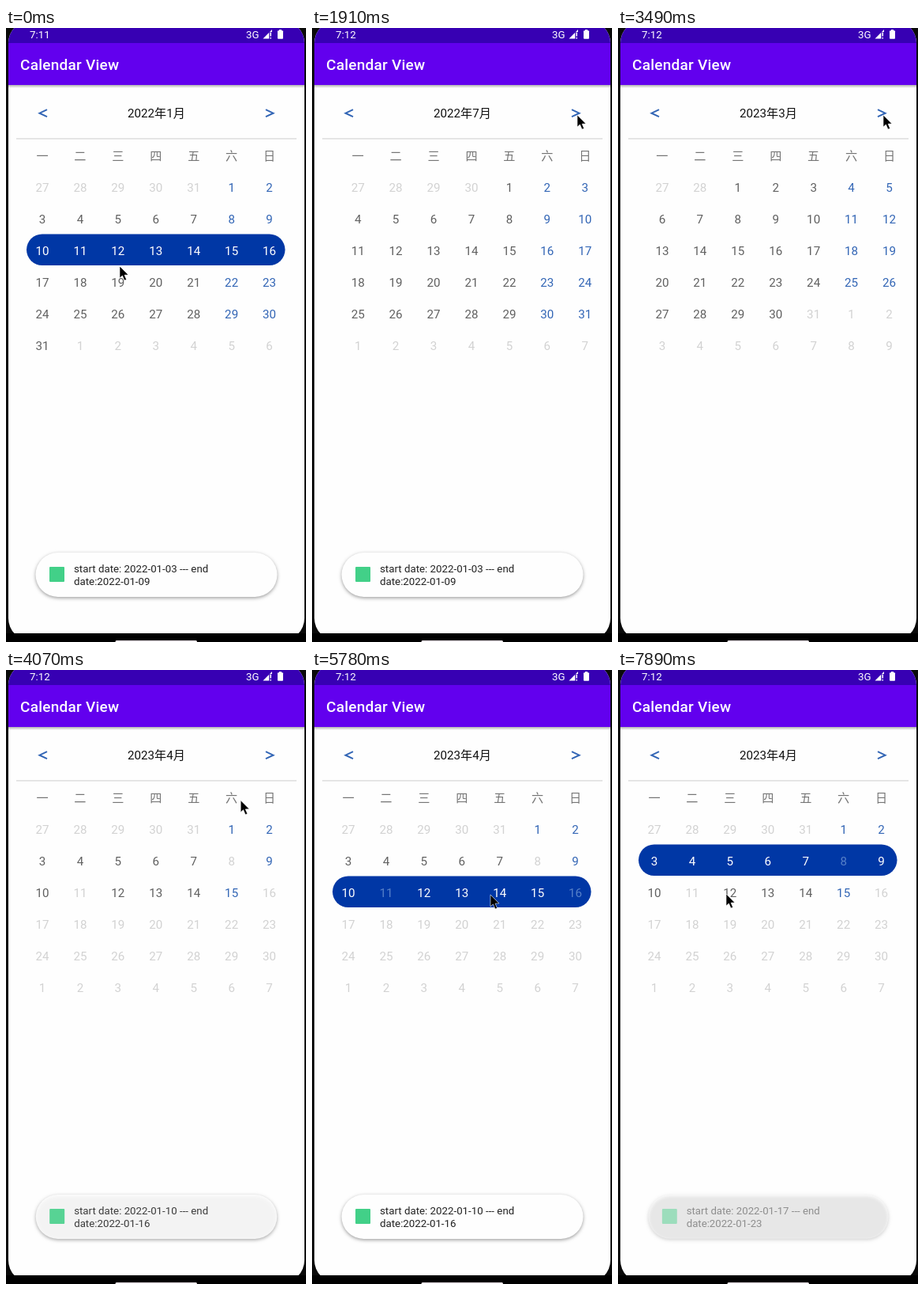
These frames come from a looping animation (380 by 776 pixels, 8 s). An HTML page with a canvas:

```html
<!DOCTYPE html>
<html lang="zh-CN">
<head>
<meta charset="utf-8">
<title>Calendar View</title>
<style>
html, body { margin: 0; width: 100%; height: 100%; overflow: hidden; background: #0a0a0a; }
canvas { display: block; width: 380px; height: 776px; }
</style>
</head>
<body>
<canvas id="stage"></canvas>
<script>
const LOOP = 8000, W = 380, H = 776;
const PAGE = 355, SLIDE = 210;
const FONT = 'Roboto, "Noto Sans CJK SC", "Noto Sans CJK", sans-serif';
const BLUE = '#3265b5', PILL = '#0037a5', TEXT = '#606060', FAINT = '#d2d2d2';

const canvas = document.getElementById('stage');
const ctx = canvas.getContext('2d');
const dpr = window.devicePixelRatio || 1;
canvas.width = W * dpr;
canvas.height = H * dpr;

// Screen updates come in bursts: [first, last, count]
const bursts = [
  [0, 0, 1], [130, 640, 5], [940, 1910, 8], [2060, 3040, 8], [3190, 4220, 8],
  [4340, 5360, 8], [5510, 6460, 8], [6610, 7010, 4], [7320, 7890, 5]
];

// Pointer path: [time, x, y]
const pointerPath = [
  [0, 144, 301], [257, 146, 306], [512, 318, 128], [640, 336, 110],
  [3780, 336, 110], [4073, 258, 220], [4220, 232, 236], [4500, 229, 240],
  [4920, 225, 277], [5360, 225, 280], [5650, 226, 284], [6050, 262, 250],
  [6460, 280, 246], [6610, 85, 301], [7010, 110, 296], [7320, 116, 293], [7890, 137, 283]
];

// Toasts: [fade-in start, fade-out start, first day, last day]
const toasts = [
  [-1000, 3200, '2022-01-03', '2022-01-09'],
  [3750, 7250, '2022-01-10', '2022-01-16'],
  [7800, 12000, '2022-01-17', '2022-01-23']
];

const clamp = v => Math.max(0, Math.min(1, v));

function sampleTime(t) {
  const [first, last, count] = bursts.filter(b => b[0] <= t).pop();
  if (count === 1) return first;
  const step = (last - first) / (count - 1);
  return first + step * Math.min(count - 1, Math.floor((t - first) / step + 1e-6));
}

function pointerAt(t) {
  const i = pointerPath.findIndex(p => p[0] > t);
  if (i < 0) return pointerPath[pointerPath.length - 1].slice(1);
  const [t0, x0, y0] = pointerPath[i - 1], [t1, x1, y1] = pointerPath[i];
  const k = (t - t0) / (t1 - t0);
  return [x0 + (x1 - x0) * k, y0 + (y1 - y0) * k];
}

// Months are counted from January 2022
const slideStart = m => m <= 6 ? 805 + 200.4 * (m - 1) : 1807 + 196.25 * (m - 6);

function monthAt(t) {
  let m = 0;
  while (m < 15 && slideStart(m + 1) <= t) m++;
  return m;
}

function selectedRow(m, t) {
  if (m === 0) return t < 250 ? 2 : 3;
  if (m === 15 && t >= 4480) return t >= 5060 && t < 6050 ? 2 : 1;
  return -1;
}

function isDisabled(date) {
  const m = (date.getFullYear() - 2022) * 12 + date.getMonth(), d = date.getDate();
  return m > 15 || (m === 14 && d === 31) || (m === 15 && (d === 8 || d === 11 || d > 15));
}

function text(str, x, y, size, color, align = 'left', weight = 400) {
  ctx.font = `${weight} ${size}px ${FONT}`;
  ctx.fillStyle = color;
  ctx.textAlign = align;
  ctx.fillText(str, x, y);
}

function rect(x, y, w, h, color, radius = 0) {
  ctx.fillStyle = color;
  ctx.beginPath();
  ctx.roundRect(x, y, w, h, radius);
  ctx.fill();
}

function poly(points, color) {
  ctx.beginPath();
  points.forEach(([x, y]) => ctx.lineTo(x, y));
  ctx.closePath();
  ctx.fillStyle = color;
  ctx.fill();
}

function chevron(x, dir) {
  ctx.beginPath();
  ctx.moveTo(x - 5 * dir, 103.2);
  ctx.lineTo(x + 4.5 * dir, 107.7);
  ctx.lineTo(x - 5 * dir, 112.2);
  ctx.strokeStyle = BLUE;
  ctx.lineWidth = 2;
  ctx.stroke();
}

function drawMonth(m, left, t) {
  const colX = c => left + 46 + 47.93 * c;
  [...'一二三四五六日'].forEach((day, c) => text(day, colX(c), 166.5, 15.2, '#757575', 'center'));

  const row = selectedRow(m, t);
  if (row >= 0) rect(left + 26, 180.5 + row * 40, 327.5, 39.5, PILL, 19.75);

  const lead = (new Date(2022, m, 1).getDay() + 6) % 7;
  const month = new Date(2022, m, 1).getMonth();
  for (let i = 0; i < 42; i++) {
    const date = new Date(2022, m, 1 - lead + i);
    const r = Math.floor(i / 7), c = i % 7;
    const off = date.getMonth() !== month || isDisabled(date);
    let color = off ? FAINT : c > 4 ? BLUE : TEXT;
    if (r === row) color = off ? '#5680c8' : '#fff';
    text(date.getDate(), colX(c), 206.5 + r * 40, 15.2, color, 'center');
  }
}

function drawCalendar(t) {
  const m = monthAt(t);
  const left = m ? PAGE * (1 - clamp((t - slideStart(m)) / SLIDE)) ** 5 : 0;
  text(`${2022 + Math.floor(m / 12)}年${m % 12 + 1}月`, 190.5, 112.7, 15.2, '#111', 'center');
  chevron(47, -1);
  chevron(334, 1);
  rect(13, 139, 355, 1.7, '#e2e2e2');

  ctx.save();
  ctx.beginPath();
  ctx.rect(13, 141, 355, 290);
  ctx.clip();
  if (left > 0.3) drawMonth(m - 1, left - PAGE, t);
  drawMonth(m, left, t);
  ctx.restore();
}

function drawToast([show, hide, from, to], t) {
  const p = Math.min(clamp((t - show) / 200), 1 - clamp((t - hide) / 200));
  if (p <= 0) return;
  ctx.save();
  ctx.globalAlpha = p;
  const scale = 0.988 + 0.012 * p;
  ctx.translate(190.5, 691);
  ctx.scale(scale, scale);
  ctx.translate(-190.5, -691);
  ctx.save();
  ctx.shadowColor = 'rgba(0,0,0,.38)';
  ctx.shadowBlur = 4 * dpr;
  ctx.shadowOffsetY = 1.5 * dpr;
  rect(37.5, 663, 306, 56, '#fefefe', 28);
  ctx.restore();
  rect(55, 681, 19, 19, '#42d088', 1);
  text(`start date: ${from} --- end`, 86, 688.3, 13.3, '#222');
  text(`date:${to}`, 86, 704.2, 13.3, '#222');
  ctx.restore();
}

function drawBars(t) {
  const shadow = ctx.createLinearGradient(0, 72, 0, 76);
  shadow.addColorStop(0, 'rgba(0,0,0,.3)');
  shadow.addColorStop(1, 'rgba(0,0,0,0)');
  rect(0, 72, W, 4, shadow);
  rect(0, 0, W, 19, '#3700b3');
  rect(0, 19, W, 53, '#6200ee');

  text(t < 380 ? '7:11' : '7:12', 30, 13.2, 13.3, '#fff');
  text('3G', 304, 13.2, 13.3, '#fff');
  poly([[325.5, 13.5], [337, 2], [337, 13.5]], '#fff');
  rect(333.3, 5, 4, 9, '#3700b3');
  rect(334.5, 5.5, 1.5, 5, '#fff');
  rect(334.5, 12, 1.5, 1.5, '#fff');
  rect(344, 3.2, 7, 10.6, '#fff', 1);
  rect(346, 2, 3, 2, '#fff');

  ctx.letterSpacing = '0.24px';
  text('Calendar View', 18, 52.8, 19, '#fff', 'left', 500);
  ctx.letterSpacing = '0px';
}

function drawPointer(t) {
  const [x, y] = pointerAt(t);
  const arrow = [[0, 0], [0, 15], [3.4, 12], [6, 18], [8.6, 17], [6.1, 11.2], [11, 11]];
  poly(arrow.map(([dx, dy]) => [x + dx, y + dy]), '#000');
  ctx.strokeStyle = 'rgba(255,255,255,.85)';
  ctx.lineWidth = 0.7;
  ctx.stroke();
}

function draw(t) {
  ctx.setTransform(dpr, 0, 0, dpr, 0, 0);
  rect(0, 0, W, H, '#0a0a0a');
  ctx.save();
  ctx.beginPath();
  ctx.roundRect(3, -9, 375, 783, 28);
  ctx.clip();
  rect(0, 0, W, H, '#fefefe');
  drawBars(t);
  drawCalendar(t);
  toasts.forEach(toast => drawToast(toast, t));
  ctx.restore();
  rect(0, 765, W, 11, '#000');
  rect(138.5, 774, 103.5, 4, '#f0e8ec', 1.5);
  drawPointer(t);
}

function frame() {
  draw(sampleTime(performance.now() % LOOP));
  requestAnimationFrame(frame);
}
frame();
</script>
</body>
</html>
```
